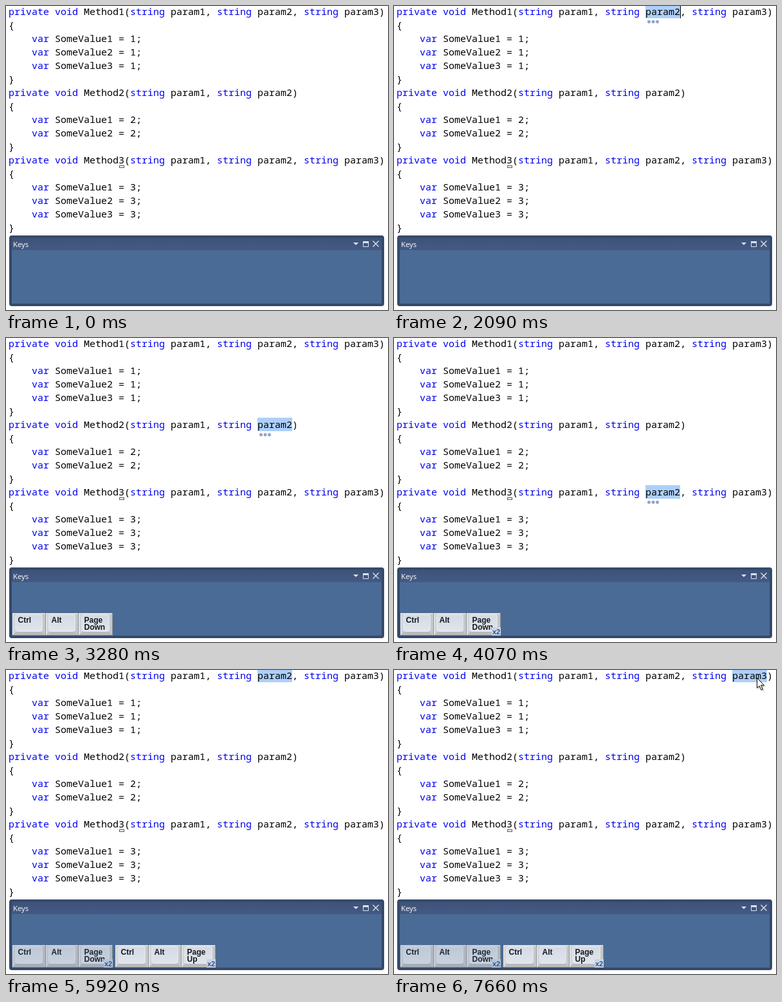
Animation, 594 px wide and 473 px high, one loop 8000 ms. Source, as an HTML page:

```html
<!DOCTYPE html>
<html lang="en">
<head>
<meta charset="utf-8">
<title>Jump between parameters</title>
<style>
  html, body { margin: 0; width: 100%; height: 100%; overflow: hidden; background: #fff; }
  svg { display: block; width: 100%; height: 100%; isolation: isolate; }
  text { white-space: pre; }
  .code { font: 15px "Noto Sans Mono", "DejaVu Sans Mono", monospace; }
  .kw { fill: #0000f0; }
  .title { font: 11.3px "Open Sans", "Noto Sans", sans-serif; fill: #fff; }
  .cap { font: bold 12px "Liberation Sans", Arial, sans-serif; fill: #16191f; }
  .badge { font: bold 11px "Liberation Sans", Arial, sans-serif; fill: #39507c; }
  .beam { mix-blend-mode: difference; }
</style>
</head>
<body>
<svg id="stage" viewBox="0 0 594 473" preserveAspectRatio="none">
  <defs>
    <linearGradient id="face" x2="0" y2="1">
      <stop stop-color="#d3dae4"/><stop offset="1" stop-color="#e1e5ec"/>
    </linearGradient>
    <linearGradient id="bar" x2="0" y2="1">
      <stop stop-color="#3e5379"/><stop offset="1" stop-color="#445a84"/>
    </linearGradient>
  </defs>
  <rect width="594" height="473" fill="#fff"/>
  <rect id="sel" width="54" height="21" fill="#add0fa"/>
  <g id="code"></g>
  <rect x="176.5" y="248.5" width="7" height="3" fill="#fff" stroke="#8a3f4a"/>
  <rect id="caret" width="1" height="21"/>
  <g id="dots" fill="#8fa4d0">
    <circle cx="5.5" cy="26.5" r="2.5"/><circle cx="12" cy="26.5" r="2.5"/><circle cx="18.5" cy="26.5" r="2.5"/>
  </g>
  <g id="panel">
    <rect x="5" y="357" width="583" height="110" rx="4" fill="#35496b"/>
    <rect x="9" y="361" width="575" height="19" fill="url(#bar)"/>
    <rect x="9" y="380" width="575" height="83" fill="#4a6b95"/>
    <text class="title" x="11" y="375">Keys</text>
    <path d="M540 368h8l-4 4z" fill="#dbe3ef"/>
    <path d="M555.5 367v7.5h8V367" fill="none" stroke="#dbe3ef"/>
    <path d="M555 366h9v3h-9z" fill="#dbe3ef"/>
    <path d="M570.5 365.5l9 9m0-9l-9 9" stroke="#dbe3ef" stroke-width="1.4"/>
  </g>
  <g id="beam" class="beam"><path d="M-3.5-8H-1L0-7L1-8H3.5M0-7V7M-3.5 8H-1L0 7L1 8H3.5" fill="none" stroke="#fff"/></g>
  <g id="arrow">
    <path d="M2 2v16l4-3 3 6 3-1-3-6h5z" fill="#000" opacity=".2"/>
    <path d="M.5.5v15.6l3.6-3.4 2.7 6.3 2.5-1-2.7-6.2h5z" fill="#fff" stroke="#000"/>
  </g>
</svg>
<script>
const LOOP = 8000, LEFT = 4, CELL = 9, ROW = 21;
const $ = id => document.getElementById(id);

function add(parent, tag, attrs, content) {
  const el = document.createElementNS("http://www.w3.org/2000/svg", tag);
  for (const k in attrs) el.setAttribute(k, attrs[k]);
  if (content) el.textContent = content;
  return parent.appendChild(el);
}

// Code listing: each word is placed on the character grid.
const method = (n, count) => [
  `private void Method${n}(${[1, 2, 3].slice(0, count).map(i => "string param" + i).join(", ")})`,
  "{",
  ...[1, 2, 3].slice(0, count).map(i => `    var SomeValue${i} = ${n};`),
  "}"
];
[...method(1, 3), ...method(2, 2), ...method(3, 3)].forEach((line, row) => {
  for (const m of line.matchAll(/\b(private|void|string|var)\b|[^\s(]+|\(/g))
    add($("code"), "text", {
      class: m[1] ? "code kw" : "code", x: LEFT + m.index * CELL, y: 14 + row * ROW
    }, m[0]);
});

// Key caps
function keyCap(parent, x, w, words) {
  const g = add(parent, "g", { transform: `translate(${x} 428)` });
  add(g, "rect", { width: w, height: 35, rx: 1, fill: "#d4d5d7" });
  add(g, "path", { d: `M0 35L6 28H${w - 6}L${w} 35z`, fill: "#b9bbbf" });
  add(g, "path", { d: `M${w} 0L${w - 5} 3V28L${w} 35z`, fill: "#c5c7ca" });
  add(g, "path", { d: `M.5 34.5V.5H${w - .5}`, fill: "none", stroke: "#eff0f1" });
  add(g, "path", { d: `M0 34.5H${w - .5}V0`, fill: "none", stroke: "#8d9198" });
  add(g, "rect", { x: 5, y: 2.5, width: w - 11, height: 26, rx: 3, fill: "url(#face)", stroke: "#e9ecf0" });
  words.forEach((s, i) => add(g, "text", { class: "cap", x: 8.5, y: 15 + 11 * i }, s));
}

function keyGroup(x, last) {
  const g = add($("panel"), "g", {});
  keyCap(g, x, 52, ["Ctrl"]);
  keyCap(g, x + 52, 51, ["Alt"]);
  keyCap(g, x + 103, 53, ["Page", last]);
  const badge = add(g, "g", {});
  add(badge, "rect", { x: x + 142, y: 450, width: 14, height: 13, fill: "#c9d6ea" });
  add(badge, "text", { class: "badge", x: x + 143, y: 461 }, "x2");
  return { g, badge };
}
const down = keyGroup(10, "Down"), up = keyGroup(170, "Up");

// time, row (-1: none), column, caret, dots
const marks = [
  [0, -1, 0, 0, 0],
  [1040, 0, 43, 1, 0], [1560, 0, 43, 0, 0], [1690, 0, 43, 0, 1], [2090, 0, 43, 1, 1],
  [2490, 6, 43, 1, 0], [3020, 6, 43, 0, 0], [3280, 6, 43, 0, 1],
  [3410, 11, 43, 1, 0], [3940, 11, 43, 0, 0], [4070, 11, 43, 0, 1],
  [4400, 6, 43, 1, 0], [4930, 6, 43, 0, 0], [5260, 6, 43, 0, 1],
  [5390, 0, 43, 1, 0], [5920, 0, 43, 0, 0], [6380, 0, 43, 0, 1], [6450, 0, 43, 1, 1],
  [7130, 0, 58, 1, 0], [7660, 0, 58, 0, 0]
];

// time, pointer kind, x, y
const pointer = [
  [0, "", 0, 0],
  [400, "beam", 430.5, -5], [460, "beam", 427.5, 0], [520, "beam", 424.5, 4],
  [580, "beam", 422.5, 6], [840, "beam", 422.5, 9],
  [1040, "arrow", 423, 8], [1130, "arrow", 424, 3], [1230, "", 0, 0]
];
for (let i = 0; i < 8; i++) {
  const rest = (1 - i / 7) ** 2;
  pointer.push([6450 + 75 * i, "beam", 564.5 + Math.round(28 * rest), 12 + Math.round(6 * rest)]);
}
pointer.push([7130, "arrow", 564, 12]);

const at = (table, t) => table.findLast(step => step[0] <= t);
const show = (el, on) => el.setAttribute("visibility", on ? "inherit" : "hidden");
const place = (el, x, y) => el.setAttribute("transform", `translate(${x} ${y})`);

// Rows of the three method headers on the 21px grid
const rowTop = row => row * ROW - 2;

function draw(t) {
  const [, row, col, caret, dots] = at(marks, t);
  const x = LEFT + col * CELL, y = rowTop(row);
  place($("sel"), x, y);
  place($("caret"), x + 54, y);
  place($("dots"), x, y);
  show($("sel"), row >= 0);
  show($("caret"), caret);
  show($("dots"), dots);

  const [, kind, px, py] = at(pointer, t);
  for (const id of ["beam", "arrow"]) {
    show($(id), id === kind);
    place($(id), px, py);
  }

  show(down.g, t >= 2490);
  show(down.badge, t >= 3410);
  down.g.setAttribute("opacity", t >= 4400 ? .84 : 1);
  show(up.g, t >= 4400);
  show(up.badge, t >= 5390);
}

const start = performance.now();
function tick() {
  draw((performance.now() - start) % LOOP);
  requestAnimationFrame(tick);
}
draw(0);
requestAnimationFrame(tick);
</script>
</body>
</html>
```
